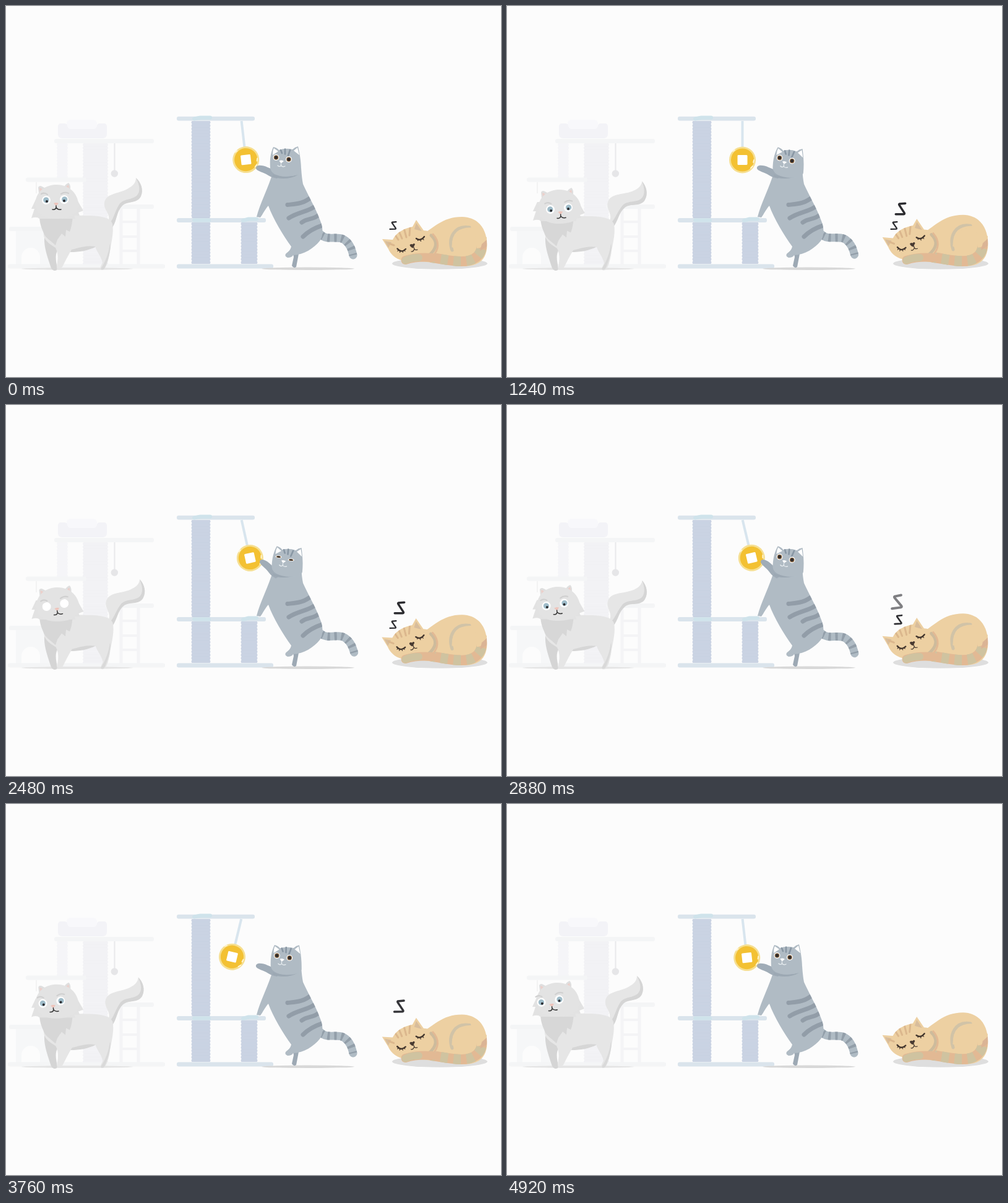
An HTML page for the animation above (4960 ms loop, 800 px wide and 600 px high).

```html
<!DOCTYPE html>
<html lang="en">
<head>
<meta charset="utf-8">
<title>Three cats</title>
<style>
html, body { margin: 0; width: 100%; height: 100%; overflow: hidden; background: #fcfcfc; }
svg { display: block; width: 100vw; height: 100vh; }
.line { fill: none; stroke-linecap: round; stroke-linejoin: round; }
</style>
</head>
<body>
<svg viewBox="0 0 800 600">
  <defs>
    <path id="tabbyShape" d="M431 270C424 294 410 320 405 341L411 342C415 337 419 328 424 323C432 345 448 371 461 389C460 395 455 398 452 401Q450 405 455 407Q462 407 464 403C482 402 497 392 507 380C513 372 513 358 507 345C500 326 488 306 480 288Q478 278 477 262z"/>
    <path id="sleepFace" d="M608 377L625 378C631 366 643 360 657 357L663 346L675 363C688 363 698 374 699 386C698 399 688 408 674 410L642 412C628 409 621 400 618 393z"/>
    <clipPath id="tabbyClip"><use href="#tabbyShape"/></clipPath>
    <clipPath id="faceClip"><use href="#sleepFace"/></clipPath>
  </defs>

  <!-- pale tower -->
  <g fill="#f4f5f6">
    <rect x="98" y="184" width="49" height="18" rx="6" fill="#f8f8fb"/>
    <path d="M84 195q0-5 5-5h5q5 0 5 4q1 5 6 5h36q5 0 6-5q0-4 5-4h6q5 0 5 5v12q0 7-7 7H91q-7 0-7-7z" fill="#f3f3f7"/>
    <rect x="78" y="215" width="161" height="7" rx="3"/>
    <g id="paleRibs"></g>
    <rect x="32" y="277.500" width="98" height="7" rx="3"/>
    <path d="M49 285v18" stroke="#f0f0f1" stroke-width="1.500"/>
    <rect x="5" y="357" width="80" height="7" rx="3"/>
    <path d="M16 364h58v54H16zM25 418h30v-12a15 15 0 0 0-30 0z" fill-rule="evenodd" fill="#f6f7f8"/>
    <rect x="160" y="321" width="79" height="7" rx="3"/>
    <path d="M186 328v90M214 328v90" stroke="#f4f4f6" stroke-width="5"/>
    <path d="M186 349h28M186 373h28M186 396h28" stroke="#f4f4f6" stroke-width="4"/>
    <rect x="3" y="417.500" width="254" height="7" rx="3"/>
    <path d="M175.500 222v46" stroke="#e9e9eb" stroke-width="2"/>
    <circle cx="175.300" cy="271" r="5.800" fill="#e6e6e8"/>
  </g>

  <!-- long-haired cat -->
  <ellipse cx="115" cy="425" rx="90" ry="1.800" fill="#e4e4e4"/>
  <g id="paleTail">
    <path fill="#e6e6e6" d="M164 351C172 337 157 331 159 318C162 303 180 304 196 296C205 291 210 286 210 278C218 285 222 298 218 306C212 318 196 313 188 322C178 333 179 346 172 358z"/>
    <path fill="#d5d5d5" d="M210 278C214 286 219 298 212 306C204 314 190 311 183 321C176 332 174 345 167 352L172 358C180 346 178 333 188 323C196 315 212 320 218 308C223 297 218 285 210 278z"/>
  </g>
  <path fill="#d6d6d6" d="M104 398C118 398 132 396 146 389L130 382L106 386z"/>
  <path fill="#d5d5d5" d="M62 374C61 390 67 406 73 424Q77 430 82 427C84 420 78 409 82 398L90 382z"/>
  <path id="paleBody" fill="#e6e6e6" d="M60 345C80 342 100 338 128 339C150 339 168 341 172 352C175 368 169 386 167 402C165 412 163 420 159 425Q155 428 152 425Q153 420 156 415C153 403 147 398 144 389C130 386 115 392 106 394C100 404 95 414 91 422Q86 426 82 422C83 413 86 403 80 391C72 386 63 380 61 372z"/>
  <path fill="#d9d9d9" d="M153 425C161 413 166 400 168 384C171 392 164 415 159 425Q155 428 153 425z"/>
  <path id="mane" fill="#d7d7d7" d="M54 338L108 338C107 350 106 358 103 365L97 362L96 373L90 368L83 378L80 387C71 378 63 375 60 365C56 356 54 348 54 338z"/>
  <g id="paleHead">
    <g id="tufts"><path fill="#e2e2e2" d="M48 313L41 328L46 328L41 343Q50 340 54 344L112 344L110 339L119 339L117 334L125 331L114 312z"/></g>
    <path fill="#dfdfdf" d="M54 311L52 294Q52 291 56 291Q62 293 68 299L93 294Q96 288 101 286Q103 287 104 292V308z"/>
    <path fill="#eccfca" d="M56 307L54 294Q59 295 63 301zM95 296Q98 291 101 289L103 302z"/>
    <path fill="#e3e3e3" d="M47 319C49 299 64 289 82 289C104 289 118 306 117 324C114 338 101 344 81 344C62 344 49 337 47 319z"/>
    <g id="paleFace">
      <path class="line" stroke="#d0d0d0" stroke-width="2.200" d="M57 304Q62 301 67 305M89 304Q95 300 101 303"/>
      <circle cx="65" cy="314" r="7" fill="#fff"/><circle cx="94" cy="313" r="7" fill="#fff"/>
      <g id="irises">
        <circle cx="64.800" cy="313.800" r="4.600" fill="#9fbcc9"/><circle cx="94.700" cy="312.800" r="4.600" fill="#9fbcc9"/>
        <circle cx="66" cy="316" r="2" fill="#2b2b2f"/><circle cx="94" cy="315" r="2" fill="#2b2b2f"/>
      </g>
      <path fill="#eec4bb" d="M77 319Q81 317 85 319L81 323.500z"/>
      <path class="line" stroke="#333" stroke-width="1.500" d="M81 323v3Q80 330 75 329M81 326Q84 330 89 329"/>
    </g>
  </g>

  <!-- blue tower -->
  <g fill="#dae4ec">
    <rect x="276" y="178.700" width="126" height="6.800" rx="3"/>
    <g id="blueRibs"></g>
    <rect x="276" y="343" width="144" height="7" rx="3"/>
    <rect x="276" y="417.500" width="156" height="7" rx="3"/>
    <path class="line" stroke="#cfe3eb" stroke-width="6" d="M304 182.500L314 180.500H330M304 346.500H328M383 347L392 344.500H405"/>
  </g>

  <!-- tabby -->
  <ellipse cx="488" cy="424.800" rx="75" ry="2.200" fill="#d8d8d8"/>
  <g id="tabbyTail" class="line" stroke-width="13">
    <path stroke="#afbbc4" d="M508 369C519 381 537 370 548 379C557 386 559 395 561 403"/>
    <path stroke="#929ea9" stroke-linecap="butt" stroke-dasharray="4 7" stroke-dashoffset="-13" d="M508 369C519 381 537 370 548 379C557 386 559 395 561 403"/>
  </g>
  <path fill="#9da9b4" d="M463 396L465 406L462 420Q465 425 469 422L473 401z"/>
  <use href="#tabbyShape" fill="#b0bbc4"/>
  <g class="line" stroke="#929da8" stroke-width="7" clip-path="url(#tabbyClip)">
    <path d="M495 308C481 320 470 320 455 321.500M504 321C488 334 474 332 457 343M510 334C496 348 490 341 478 350M514 354C500 358 490 363 480 373"/>
  </g>
  <g id="pendulum">
    <path d="M380.500 186v43" stroke="#d8e5ee" stroke-width="4"/>
    <circle cx="380.500" cy="249" r="21.500" fill="#f6df91"/>
    <circle cx="380.500" cy="249" r="18.600" fill="#f3c133"/>
    <path class="line" stroke="#fff6d5" stroke-width="1.800" d="M365 235l3-2M394 262l3-3M398 253l1-4"/>
    <rect x="372.500" y="241" width="16" height="16" rx="1.500" fill="#fff"/>
  </g>
  <path id="arm" fill="#a0acb7" d="M404 263C403 256 414 257 423 261Q434 266 446 269L438 279Q430 278 424 274C415 268 407 268 404 263z"/>
  <path fill="#9ca8b3" d="M431 272Q450 279 472 273Q462 279 448 279Q438 279 431 276z"/>
  <g id="tabbyHead">
    <path fill="#b0bbc4" d="M427 262C426 248 428 237 432 228Q438 229 441 233Q452 229 463 232Q467 228 472 227C475 240 477 252 477 266Q475 275 452 275.500Q429 275 427 262z"/>
    <path fill="#fff" d="M431 241Q431 233 433 230L440 235zM465 234L471 229L474 241z"/>
    <path class="line" stroke="#8997a4" stroke-width="2.600" d="M444 233l2 5M451 231.500v8M459 233l-3 9"/>
    <g id="tabbyEyeL"><circle cx="436.500" cy="245" r="5" fill="#fff"/><circle cx="436.500" cy="245" r="3.800" fill="#94714a"/><circle cx="436.500" cy="245" r="2.700" fill="#302b2b"/></g>
    <g id="tabbyEyeR"><circle cx="457" cy="248" r="5" fill="#fff"/><circle cx="457" cy="248" r="3.800" fill="#94714a"/><circle cx="457" cy="248" r="2.700" fill="#302b2b"/></g>
    <path fill="#fff" d="M441.500 250.500Q445 248.500 449 251L444.500 254.500z"/>
    <path class="line" stroke="#e9eef1" stroke-width="1.200" d="M444.500 255v3Q442 261 439 258M444.500 258Q447 261 451 259"/>
  </g>

  <!-- sleeper -->
  <ellipse cx="701" cy="416.500" rx="77" ry="9.300" fill="#dedede"/>
  <g id="sleepBody">
    <path fill="#edd0a2" d="M665 374C691 360 704 341 737 341C764 341.500 777 361 777.500 386C777 410 765 420 742 421L700 416L660 412z"/>
    <path class="line" stroke="#d1c3a7" stroke-width="5" d="M749 358C724 354 714 376 721 395"/>
    <path class="line" stroke="#edd0a2" stroke-width="3" d="M753 360C733 358 722 372 722 389"/>
    <g class="line" stroke-width="16">
      <path stroke="#e2b994" d="M769 383C770 402 758 413 736 413C719 413 705 409 688 407"/>
      <path stroke="#cfc3a0" stroke-linecap="butt" stroke-dasharray="12 9" stroke-dashoffset="-10" d="M769 383C770 402 758 413 736 413C719 413 705 409 688 407"/>
    </g>
    <path fill="#edd0a2" d="M758 369L777 374L776 384Q770 391 761 392z"/>
    <path fill="#dbb495" d="M777 378V389L766 396L769 385z"/>
  </g>
  <g id="sleepHead">
    <use href="#sleepFace" fill="#edd0a2"/>
    <path fill="#d8bd9c" d="M612 380L623 382L618 391zM663 351L672 364L660 361z"/>
    <g class="line" stroke="#dbb78d" stroke-width="3" clip-path="url(#faceClip)"><path d="M626 366l8 12M634 362l6 14M643 359l4 15M653 358l-1 13M619 384l8 3"/></g>
    <path class="line" stroke="#cdbb9c" stroke-width="5" d="M687 371C698 381 697 392 683 404"/>
    <path class="line" stroke="#e2b994" stroke-width="3" d="M690 369C701 381 700 394 689 405"/>
    <g class="line" stroke="#43362d" stroke-width="2.400">
      <path d="M632.500 392.500Q639 400 646 393M663 376Q670 381 676 373"/>
      <path stroke-width="1.200" d="M634 395l-1 1.500M637 397l-.5 1.500M641 397l.5 1.500M644 395l1 1.500M666 378l-.5 1.500M670 379l.5 1.500M674 377l1 1"/>
      <path stroke-width="1.200" d="M659 390Q660 396 665 394M660 393Q658 398 655 397"/>
    </g>
    <path fill="#483a31" d="M652.500 386.500Q654 384 657 385.500Q660 382.500 661 385.500L658 391.500Q653.500 390 652.500 386.500z"/>
  </g>
  <path class="line" stroke="#e2b994" stroke-width="14" d="M645.500 411Q664 405 689 407"/>
  <path class="line" stroke="#cfc3a0" stroke-width="12" d="M645.500 411.500Q654 407 667 407"/>
  <g id="zees"></g>
</svg>
<script>
const LOOP = 4960, STEP = 40;
const $ = id => document.getElementById(id);
const move = (id, value) => $(id).setAttribute('transform', value);

function add(parent, tag, attrs) {
  const el = document.createElementNS('http://www.w3.org/2000/svg', tag);
  for (const k in attrs) el.setAttribute(k, attrs[k]);
  return parent.appendChild(el);
}

// Rope-wrapped post: a solid core with rounded rings
function post(id, x, width, top, bottom, core, ring) {
  add($(id), 'rect', { x: x + 1, y: top, width: width - 2, height: bottom - top, fill: core });
  for (let y = top; y < bottom - 2; y += 5.2)
    add($(id), 'rect', { x, y, width, height: 4.6, rx: 2.3, fill: ring });
}
post('paleRibs', 82, 18, 222, 278, '#f4f4f7', '#f5f5f8');
post('paleRibs', 124, 41, 222, 418, '#f1f1f4', '#f2f2f5');
post('blueRibs', 299.5, 31, 186, 343, '#c6d0e1', '#cad3e3');
post('blueRibs', 299.5, 31, 350, 417, '#c6d0e1', '#cad3e3');
post('blueRibs', 379.5, 27, 350, 417, '#c6d0e1', '#cad3e3');

const sine = u => (1 - Math.cos(Math.PI * u)) / 2;
const linear = u => u;

// Steps are [time, value, value...]
function at(t, steps, ease = sine) {
  if (t <= steps[0][0]) return steps[0].slice(1);
  for (let i = 1; i < steps.length; i++) {
    const a = steps[i - 1], b = steps[i];
    if (t <= b[0]) {
      const u = ease((t - a[0]) / (b[0] - a[0]));
      return a.slice(1).map((v, j) => v + (b[j + 1] - v) * u);
    }
  }
  return steps[steps.length - 1].slice(1);
}

const swing = [[920, 6.5], [1820, -16.5], [2560, 13.4], [3320, 13.4], [3860, -16], [4470, 6.5]];
const reach = [[1980, 0], [2400, 21], [3320, 21], [3720, 0]];
const tilt = [[460, 0], [1040, 5.5], [3420, 5.5], [3980, 0]];
const wag = [[0, 0], [1160, 1], [1860, 0.1], [2860, 1], [3260, 0.95], [4200, 0]];
const tailTip = [[0, 0], [1200, -1], [1800, 0], [2480, -3], [3280, 0]];
// face x, y, angle, then head x, y
const look = [[0, 0, 0, 0, 0, 0], [1000, 5, 14, -4, 3, 8], [1240, 5, 14, -4, 3, 8],
  [1800, 1.5, 12, -7, 1, 7], [2480, 0.5, 10, -8, 1.5, 6], [3280, -3.5, 8.5, -6, 0.5, 4],
  [4240, -7.5, 5.5, -6, 0, 1.5], [4920, -9.5, 5, -7, 0, 0]];
// x, y, scale, angle, opacity
const drift = [[0, 625.5, 355, 0.7, 0, 1], [560, 635, 344, 0.86, 0, 1], [800, 637, 338, 0.95, -2, 1],
  [1240, 636, 328, 1.06, 2, 1], [1800, 627, 314.5, 1.25, -8, 0.44],
  [2040, 621.5, 313, 1.3, -20, 0.25], [2300, 613, 309, 1.35, -30, 0]];
const blinks = [2480, 4240];

const zees = [0, 1240, 2480].map(start => ({
  start,
  el: add($('zees'), 'path', {
    d: 'M7-8.500L-2-7.500Q-3-7-2-5.500L6 6Q7 8 5 8L-7 8.500', class: 'line', stroke: '#2c2c30', 'stroke-width': 3.3
  })
}));

function draw(t) {
  move('pendulum', `rotate(${-at(t, swing)[0]} 380.5 185)`);
  move('arm', `rotate(${at(t, reach)[0]} 433 274)`);

  const turn = at(t, tilt)[0];
  move('tabbyHead', `translate(${turn * 0.2} ${turn * 0.4}) rotate(${turn} 455 275)`);
  const squint = Math.abs(t - blinks[0]) < 100 ? 0.4 : 1;
  move('tabbyEyeL', `translate(0 ${245 * (1 - squint)}) scale(1 ${squint})`);
  move('tabbyEyeR', `translate(0 ${248 * (1 - squint)}) scale(1 ${squint})`);
  move('tabbyTail', `rotate(${at(t, tailTip)[0]} 510 370)`);

  const sway = at(t, wag)[0];
  move('paleTail', `rotate(${sway * 7} 168 350)`);
  move('paleBody', `translate(${sway} ${sway})`);

  const [fx, fy, angle, hx, hy] = at(t, look, linear);
  move('paleHead', `translate(${hx} ${hy})`);
  move('tufts', `translate(${-hx * 0.7} ${-hy * 0.5})`);
  move('mane', `translate(0 ${hy * 0.2})`);
  move('paleFace', `translate(${fx - hx} ${fy - hy}) rotate(${angle} 80 314)`);
  $('irises').style.display = blinks.some(b => Math.abs(t - b) < 100) ? 'none' : '';

  const breath = (1 - Math.cos(2 * Math.PI * t / 2000)) / 2;
  const grow = 1 + breath * 0.047;
  move('sleepBody', `translate(0 ${422 * (1 - grow)}) scale(1 ${grow})`);
  move('sleepHead', `translate(${-2 * breath} ${-1.5 * breath}) rotate(${1.3 * breath} 690 400)`);

  for (const { start, el } of zees) {
    const age = t - start;
    const [x, y, size, spin, alpha] = at(age, drift, linear);
    el.setAttribute('transform', `translate(${x} ${y}) rotate(${spin}) scale(${size})`);
    el.setAttribute('opacity', age < 0 ? 0 : alpha);
  }
}

const begun = performance.now();
function tick() {
  const t = (performance.now() - begun) % LOOP;
  draw(Math.floor(t / STEP) * STEP);
  requestAnimationFrame(tick);
}
tick();
</script>
</body>
</html>
```
